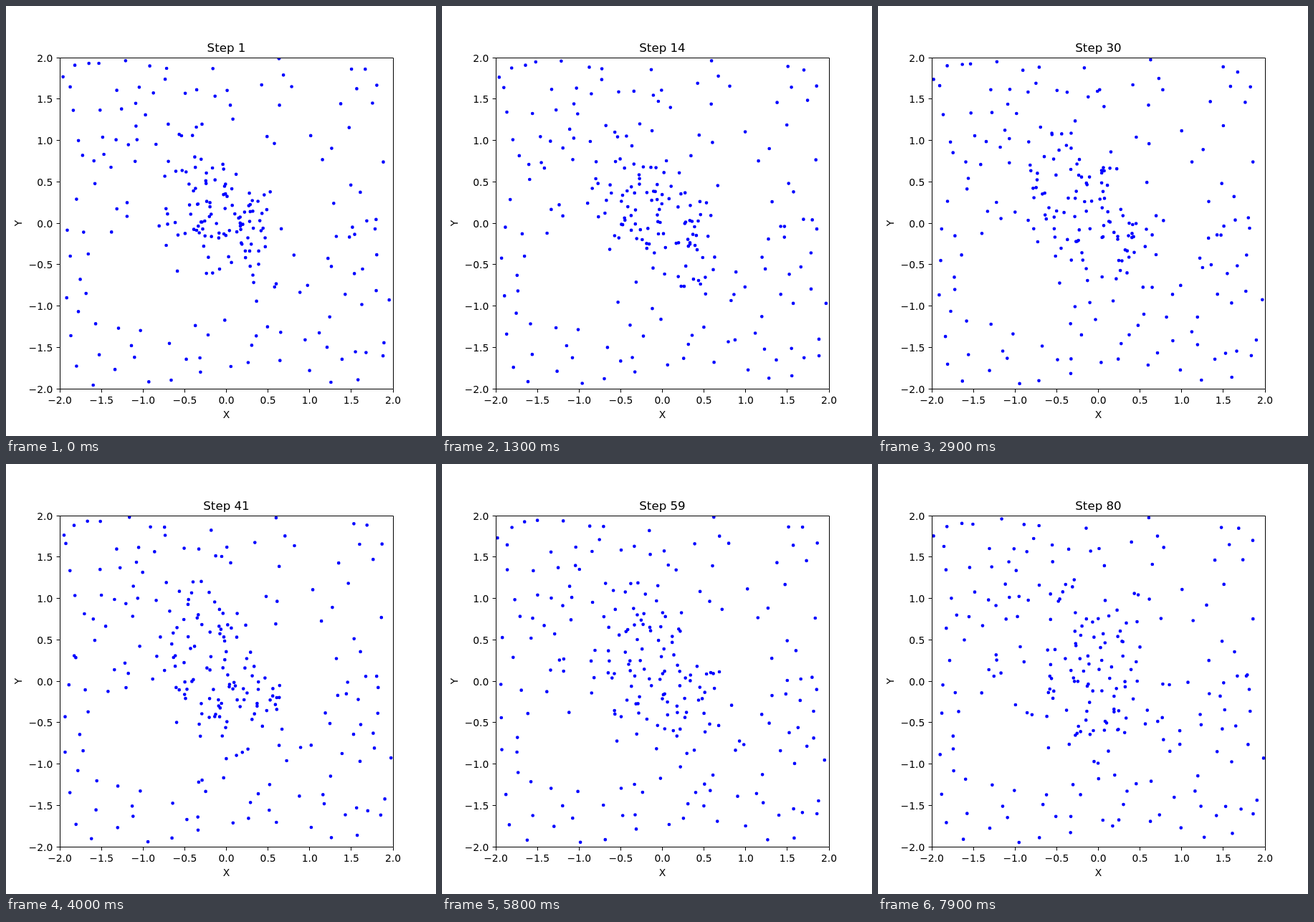
An HTML page that plays this animation: 600 px wide and 600 px high, repeating every 8000 ms.

```html
<!DOCTYPE html>
<html lang="en">
<head>
<meta charset="utf-8">
<title>Particle steps</title>
<style>
  html, body { margin: 0; width: 100%; height: 100%; overflow: hidden; background: #fff; }
  svg { display: block; width: 600px; height: 600px; }
  text { font: 13.889px "DejaVu Sans", sans-serif; text-anchor: middle; fill: #000; }
  #title { font-size: 16.667px; }
  .y { text-anchor: end; }
  #dots { stroke: #00f; stroke-width: 4.7; stroke-linecap: round; fill: none; }
  #frame { stroke: #000; stroke-width: 1; fill: none; }
</style>
</head>
<body>
<svg viewBox="0 0 600 600">
  <clipPath id="area"><rect x="75" y="72" width="465" height="462"/></clipPath>
  <g clip-path="url(#area)"><path id="dots"/></g>
  <path id="frame"/>
  <g id="labels"></g>
  <text id="title" x="307.5" y="64">Step 1</text>
  <text x="307.5" y="575">X</text>
  <text transform="translate(22 303) rotate(-90)">Y</text>
</svg>
<script>
const STEPS = 80, STEP_MS = 100;
const LEFT = 75, TOP = 72, RIGHT = 540, BOTTOM = 534;
const CX = 307.5, CY = 303;
const el = id => document.getElementById(id);

let seed = 20;
function rand() {
  seed = (seed + 0x6D2B79F5) | 0;
  let t = Math.imul(seed ^ (seed >>> 15), 1 | seed);
  t = (t + Math.imul(t ^ (t >>> 7), 61 | t)) ^ t;
  return ((t ^ (t >>> 14)) >>> 0) / 4294967296;
}
const gauss = () => Math.sqrt(-2 * Math.log(1 - rand())) * Math.cos(2 * Math.PI * rand());
const between = (a, b) => a + (b - a) * rand();
const bounce = (v, lo, hi) => v < lo ? 2 * lo - v : v > hi ? 2 * hi - v : v;

// Trembling particles: evenly spaced around the core, with a gap at the lower left
function makeHomes(count) {
  const homes = [];
  for (let tries = 0; homes.length < count && tries < 9000; tries++) {
    const x = between(LEFT + 3, RIGHT - 3), y = between(TOP + 3, BOTTOM - 3);
    const far = (px, py, r) => Math.hypot(x - px, y - py) > r;
    if (far(CX, CY, 130) && far(185, 385, 68) && homes.every(h => far(h[0], h[1], 15))) {
      homes.push([x, y]);
    }
  }
  return homes;
}

// Random offset, longer along the diagonal that falls to the right
function scatter(along, across) {
  const a = along * gauss() * Math.SQRT1_2, b = across * gauss() * Math.SQRT1_2;
  return [a + b, a - b];
}

// Wandering particles: a core that slowly spreads
function makeWalkers(count) {
  return Array.from({ length: count }, () => {
    const [dx, dy] = scatter(58, 40);
    return [CX - 4 + dx, CY - 4 + dy];
  });
}

const homes = makeHomes(127), walkers = makeWalkers(118);
const dot = (x, y) => `M${x.toFixed(1)} ${y.toFixed(1)}h0`;

const paths = Array.from({ length: STEPS }, () => {
  let d = "";
  for (const [x, y] of homes) d += dot(x + 2 * gauss(), y + 2 * gauss());
  for (const w of walkers) {
    d += dot(w[0], w[1]);
    const [dx, dy] = scatter(6, 4.5);
    w[0] = bounce(w[0] + dx, LEFT, RIGHT);
    w[1] = bounce(w[1] + dy, TOP, BOTTOM);
  }
  return d;
});

function drawAxes() {
  const snap = v => Math.floor(v) + 0.5;
  let d = "M75.5 72.5H540.5V534.5H75.5Z", labels = "";
  for (let i = 0; i <= 8; i++) {
    const value = -2 + i / 2;
    const name = (value < 0 ? "\u2212" : "") + Math.abs(value).toFixed(1);
    const x = LEFT + i * 58.125, y = BOTTOM - i * 57.75;
    d += `M${snap(x)} 534.5v4.9M75.5 ${snap(y)}h-4.9`;
    labels += `<text x="${x}" y="555">${name}</text>`;
    labels += `<text class="y" x="65.3" y="${Math.round(y + 5.5)}">${name}</text>`;
  }
  el("frame").setAttribute("d", d);
  el("labels").innerHTML = labels;
}

let shown = -1;
function tick() {
  const step = Math.floor(performance.now() / STEP_MS) % STEPS;
  if (step !== shown) {
    shown = step;
    el("dots").setAttribute("d", paths[step]);
    el("title").textContent = `Step ${step + 1}`;
  }
  requestAnimationFrame(tick);
}

drawAxes();
tick();
</script>
</body>
</html>
```
